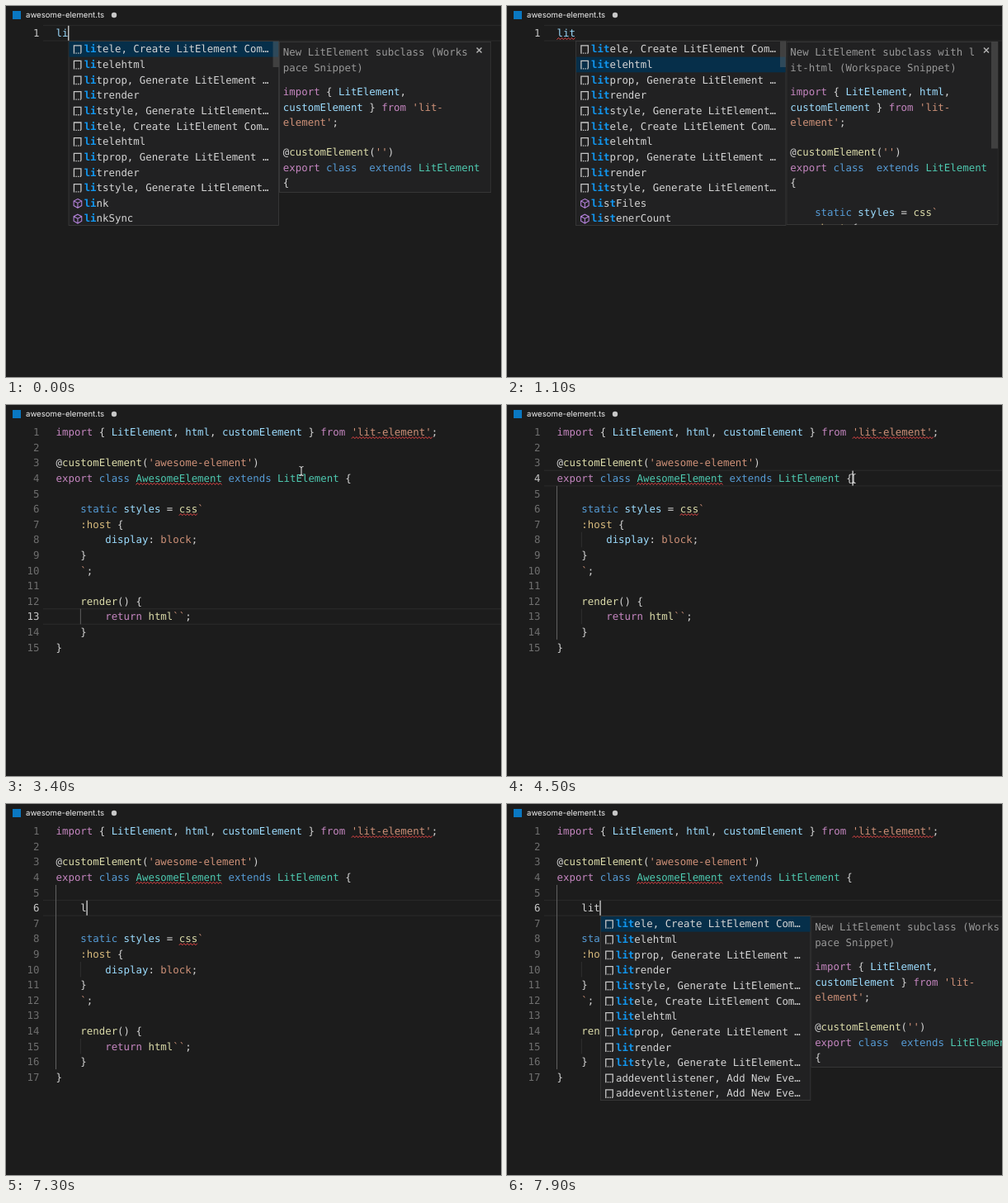
Recreate the animation shown at these times as an HTML page. Size 600x449 px, loop 8000 ms.

```html
<!DOCTYPE html>
<html lang="en">
<head>
<meta charset="utf-8">
<title>Editor snippets</title>
<style>
  html, body { margin: 0; width: 100%; height: 100%; overflow: hidden; background: #1c1c1c; }
  svg { display: block; }
  #stage { width: 100vw; height: 100vh; }
  text {
    font: 12.4px "DejaVu Sans Mono", monospace;
    white-space: pre; text-rendering: geometricPrecision; fill: #d4d4d4;
  }
  .title { font: 9.6px Inter, sans-serif; fill: #f0f0f0; }
  .num { fill: #6e6e6e; text-anchor: end; }
  .num.on { fill: #c6c6c6; }
  .note { fill: #989898; }
  .p { fill: #c586c0; } .k { fill: #569cd6; } .t { fill: #4ec9b0; }
  .v { fill: #9cdcfe; } .s { fill: #ce9178; } .f { fill: #dcdcaa; }
  .c { fill: #d7ba7d; } .h { fill: #1197f0; font-weight: bold; }
  .wave { fill: none; stroke: #e04545; stroke-width: 1; }
</style>
</head>
<body>
<svg id="stage" viewBox="0 0 600 449" preserveAspectRatio="none"></svg>
<script>
const LOOP = 8000, STEP = 100;
const CHAR = 7.465, ROW = 18.6, LEFT = 60.5, TOP = 23.5;
const colX = col => LEFT + col * CHAR;
const rowY = row => TOP + row * ROW;

// Markup: ~kword~ colours "word" with class k; a capital letter also underlines it.
const code = [
  "~pimport~ { ~vLitElement~, ~vhtml~, ~vcustomElement~ } ~pfrom~ ~S'lit-element'~;",
  "",
  "@~fcustomElement~(~s'awesome-element'~)",
  "~pexport~ ~kclass~ ~TAwesomeElement~ ~kextends~ ~tLitElement~ {",
  "",
  "    ~kstatic~ ~vstyles~ = ~Fcss~~s`~",
  "    ~c:host~ {",
  "        ~vdisplay~: ~sblock~;",
  "    }",
  "    ~s`~;",
  "",
  "    ~frender~() {",
  "        ~preturn~ ~fhtml~~s``~;",
  "    }",
  "}"
];

const snippets = ["litele, Create LitElement Com…", "litelehtml", "litprop, Generate LitElement …",
  "litrender", "litstyle, Generate LitElement…"];
const addEvent = "addeventlistener, Add New Eve…";
const decorated = ["@~fcustomElement~(~s''~)", "~pexport~ ~kclass~  ~kextends~ ~tLitElement~", "{"];
const docs = {
  plain: {
    height: 183, note: ["New LitElement subclass (Works", "pace Snippet)"],
    lines: ["~pimport~ { ~vLitElement~,", "~vcustomElement~ } ~pfrom~ ~s'lit-~", "~selement'~;", "", ...decorated]
  },
  html: {
    height: 222, note: ["New LitElement subclass with l", "it-html (Workspace Snippet)"],
    lines: ["~pimport~ { ~vLitElement~, ~vhtml~,", "~vcustomElement~ } ~pfrom~ ~s'lit-~", "~selement'~;", "",
      ...decorated, "", "    ~kstatic~ ~vstyles~ = ~fcss~~s`~", "    ~c:host~ {"]
  }
};

const rect = (x, y, w, h, fill, more = "") =>
  `<rect x="${x}" y="${y}" width="${w}" height="${h}" fill="${fill}" ${more}/>`;
const text = (x, y, content, cls = "") => `<text x="${x}" y="${y}" class="${cls}">${content}</text>`;
const parts = line => line.split("~").map((word, i) =>
  i % 2 ? { tag: word[0], word: word.slice(1) } : { tag: "", word });
const spans = (line, colour = true) => parts(line).map(({ tag, word }) =>
  tag && colour ? `<tspan class="${tag.toLowerCase()}">${word}</tspan>` : word).join("");

function wave(row, col, length) {
  let d = `M${colX(col)} ${rowY(row) + 17.2}`;
  const bumps = Math.round(length * CHAR / 2);
  for (let i = 0; i < bumps; i++) d += `l2 ${i % 2 ? 2.2 : -2.2}`;
  return `<path class="wave" d="${d}"/>`;
}

function waves(line, row) {
  let col = 0, out = "";
  for (const { tag, word } of parts(line)) {
    if (/[A-Z]/.test(tag)) out += wave(row, col, word.length);
    col += word.length;
  }
  return out;
}

const caret = (row, col) => rect(colX(col) - 0.4, rowY(row) + 0.3, 1.4, 18, "#c8c8c8");
const guide = (col, from, to, fill) => rect(colX(col) - 0.5, rowY(from), 1, (to - from) * ROW, fill);

const snippetIcon = (x, y) =>
  `<path d="M${x} ${y + 9}V${y}H${x + 8.5}V${y + 9}" fill="none" stroke="#c5c5c5" stroke-width="1.3"/>` +
  `<path d="M${x - 0.6} ${y + 9.4}h10" stroke="#c5c5c5" stroke-width="1.3" stroke-dasharray="1.4 1.2"/>`;
const cubeIcon = (x, y) =>
  `<path d="M${x + 4.5} ${y - 0.7}l4.8 2.5v5.6l-4.8 2.8l-4.8 -2.8v-5.6zm-4.8 2.5l4.8 2.5l4.8 -2.5m-4.8 2.5v5.8"
    fill="none" stroke="#b180d7" stroke-width="1.1"/>`;

function popup(row, col, { typed, selected, tail, cubes, doc, thumb }) {
  const x = colX(col) + 0.6, y = rowY(row + 1) + 0.3, pitch = 18.64;
  const mark = s => `~h${s.slice(0, typed)}~${s.slice(typed)}`;
  const items = [...snippets, ...snippets].map(mark).concat(tail);
  let out = rect(x, y, 254.5, 223, "#212122", 'stroke="#3c3c3c" stroke-width=".8"');
  out += rect(x + 0.4, y + 0.6 + selected * pitch, 253.7, pitch, "#062f4a");
  items.forEach((item, i) => {
    const top = y + 0.6 + i * pitch;
    out += (i > 9 && cubes ? cubeIcon : snippetIcon)(x + 6.4, top + 4.8);
    out += text(x + 18.6, top + 13.4, spans(item));
  });
  if (thumb) out += rect(x + 247.5, y + 0.6, 7, 31, "#797979", 'opacity=".35"');
  return doc ? out + detail(x + 255, y + 0.6, docs[doc]) : out;
}

function detail(x, y, { height, note, lines }) {
  let out = rect(0.4, 0.4, 256.4, height - 0.8, "#212122", 'stroke="#3c3c3c" stroke-width=".8"');
  note.forEach((line, i) => out += text(4.8, 17.1 + i * 18.5, line, "note"));
  lines.forEach((line, i) => out += text(4.8, 65.3 + i * 18.25, spans(line)));
  out += `<path d="M239.5 7.5l6 6m0 -6l-6 6" stroke="#b0b0b0" stroke-width="1.5"/>`;
  if (height > 200) out += rect(248.5, 0.5, 8, 129, "#797979", 'opacity=".35"');
  return `<svg x="${x}" y="${y}" width="257" height="${height}">${out}</svg>`;
}

function ibeam(x, y) {
  const d = `M${x - 2.5} ${y - 5.5}q2.5 0 2.5 2v7q0 2 -2.5 2m5 0q-2.5 0 -2.5 -2v-7q0 -2 2.5 -2`;
  return `<path d="${d}" fill="none" stroke="#d8d8d8" stroke-width="1.1"/>`;
}

const pointerPath = [[3200, 330, 128], [3400, 358, 80], [3700, 402, 84], [4000, 420, 89]];
function pointerAt(t) {
  const next = pointerPath.findIndex(p => p[0] > t);
  if (next < 0) return pointerPath.at(-1).slice(1);
  const [t0, x0, y0] = pointerPath[next - 1], [t1, x1, y1] = pointerPath[next];
  const k = (t - t0) / (t1 - t0);
  return [x0 + (x1 - x0) * k, y0 + (y1 - y0) * k];
}

const within = (t, ...spansOn) => spansOn.some(([from, to]) => t >= from && t < to);
const caretOn = t => within(t, [0, 500], [1200, 2100], [2700, 3200], [3700, 4100],
  [4300, 4800], [5300, 6100], [6800, LOOP]);

function page(lines, row, coloured = true) {
  let out = rect(45, rowY(row) - 0.6, 555, 1.2, "#282828") + rect(45, rowY(row + 1) - 0.6, 555, 1.2, "#282828");
  lines.forEach((line, i) => {
    const y = rowY(i) + 13.6;
    out += text(40.4, y, i + 1, i === row ? "num on" : "num") + text(LEFT, y, spans(line, coloured));
  });
  return out;
}

function opening(t) {
  const typed = t < 200 ? 2 : 3, second = t >= 800;
  const tail = typed === 2 ? ["~hli~nk", "~hli~nkSync"] : ["~hli~s~ht~Files", "~hli~s~ht~enerCount"];
  return page([`~v${"lit".slice(0, typed)}~`], 0) +
    (t >= 700 ? wave(0, 0, 3) : "") +
    (caretOn(t) ? caret(0, typed) : "") +
    popup(0, typed, { typed, selected: second ? 1 : 0, tail, cubes: true, doc: second ? "html" : "plain", thumb: true });
}

function editing(t) {
  const extra = t < 5500 ? 0 : t < 5800 ? 1 : 2;
  const typed = t < 7300 ? 0 : t < 7400 ? 1 : t < 7500 ? 2 : 3;
  const [row, col] = t < 4300 ? [12, 25 - 5] : extra ? [3 + extra, 4 + typed] : [3, 48];
  const lines = [...code.slice(0, 4), ...Array(extra).fill(""), ...code.slice(4)];
  if (typed) lines[row] = "    " + "lit".slice(0, typed);

  let out = page(lines, row, t >= 1800);
  if (t < 4300) out += guide(4, 12, 13, "#606060");
  else out += guide(0, 4, 14 + extra, "#606060") +
    [7, 12].map(r => guide(4, r + extra, r + extra + 1, "#303030")).join("");
  out += t < 2400 ? wave(0, 0, 3) : lines.map(waves).join("");
  if (caretOn(t)) out += caret(row, col);
  if (within(t, [3200, 5500])) out += ibeam(...pointerAt(t));
  if (t >= 7600) out += popup(row, col, {
    typed, selected: 0, tail: [addEvent, addEvent], doc: t >= 7700 && "plain"
  });
  return out;
}

const header = rect(8, 6, 10, 10, "#0a78c2") + text(24, 14.4, "awesome-element.ts", "title") +
  '<circle cx="131" cy="11" r="3.2" fill="#c8c8c8"/>';
const stage = document.getElementById("stage");
let shown = -1;

function tick(now) {
  const t = Math.floor(now % LOOP / STEP) * STEP;
  if (t !== shown) {
    shown = t;
    stage.innerHTML = rect(0, 0, 600, 449, "#1c1c1c") + header + (t < 1200 ? opening(t) : editing(t));
  }
  requestAnimationFrame(tick);
}
tick(performance.now());
</script>
</body>
</html>
```
